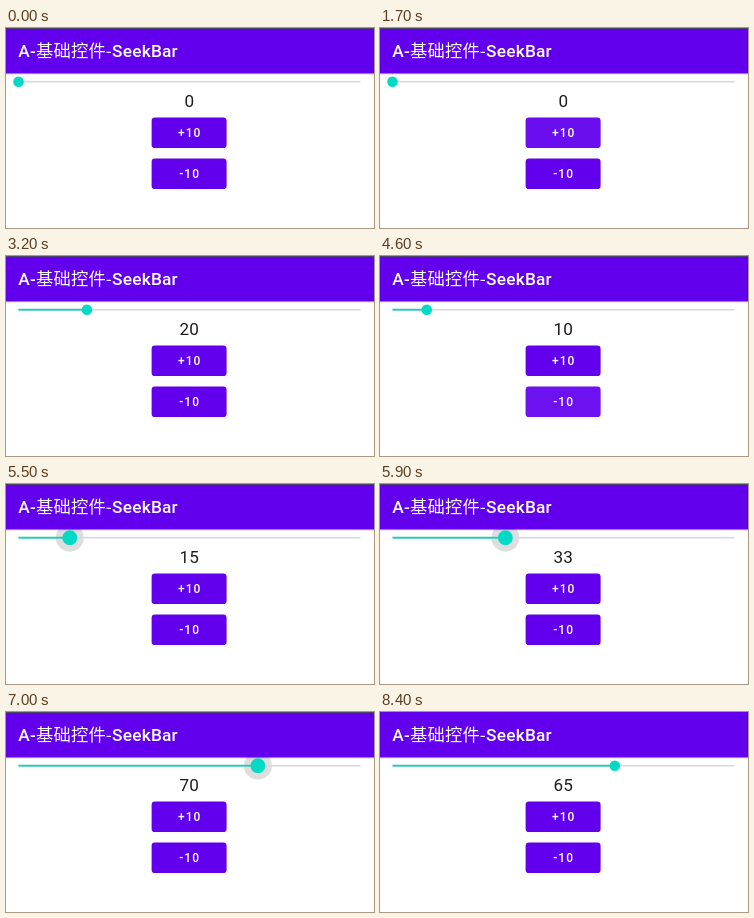
An HTML page with a canvas for the animation above (8.5 s loop, 368 px wide and 200 px high).

```html
<!DOCTYPE html>
<html lang="zh">
<head>
<meta charset="utf-8">
<title>SeekBar</title>
<style>
html, body { margin: 0; width: 100%; height: 100%; overflow: hidden; background: #fff; }
canvas, svg { position: absolute; left: 0; top: 0; width: 368px; height: 200px; }
text { font-family: Roboto, "Noto Sans CJK SC", "Noto Sans CJK", sans-serif; }
.title { font-size: 17.3px; font-weight: 500; letter-spacing: .21px; fill: #fff; }
.cjk { font-family: "Noto Sans CJK SC", "Noto Sans CJK", sans-serif; font-weight: 400; }
.value { font-size: 17.1px; fill: #1c1c1c; text-anchor: middle; }
.label { font-size: 12px; font-weight: 500; letter-spacing: 1.07px; fill: #fff; text-anchor: middle; }
</style>
</head>
<body>
<canvas id="stage"></canvas>
<svg viewBox="0 0 368 200">
  <text class="title" x="12.3" y="28.7">A-<tspan class="cjk">基础控件-</tspan>SeekBar</text>
  <text class="value" id="value" x="183.2" y="79.4">0</text>
  <text class="label" x="183.7" y="109.3">+10</text>
  <text class="label" x="183.7" y="150.3">-10</text>
</svg>
<script>
const LOOP = 8500, STEP = 100;
const PURPLE = '#6200ee', TEAL = '#03dac5';
const TRACK = { x: 12.5, w: 342, y: 53.7 };

const canvas = document.getElementById('stage');
const label = document.getElementById('value');
const ctx = canvas.getContext('2d');
const dpr = window.devicePixelRatio || 1;
canvas.width = 368 * dpr;
canvas.height = 200 * dpr;
ctx.scale(dpr, dpr);

const clamp = u => Math.max(0, Math.min(1, u));
const ramp = (t, from, to) => clamp((t - from) / (to - from));
const easeOut = u => 1 - (1 - u) ** 2;
const smooth = u => u * u * (3 - 2 * u);

// Taps step the value; then a drag creeps up, sweeps right and settles back.
function progress(t) {
  if (t < 1800) return 0;
  if (t < 2800) return 10;
  if (t < 4400) return 20;
  return Math.round(10
    + 28 * ramp(t, 5300, 6000) ** 1.4
    + 48 * easeOut(ramp(t, 6000, 6500))
    - 21 * smooth(ramp(t, 6600, 7200)));
}

// Strength of the halo while the thumb is held
const hold = t => ramp(t, 5050, 5300) * (1 - ramp(t, 7200, 7500));

// Button highlight: quick rise, slower fade
const glow = (t, start, end) =>
  .1 * Math.min(ramp(t, start - 100, start + 100), 1 - ramp(t, end - 300, end));

function rect(x, y, w, h, color) {
  ctx.fillStyle = color;
  ctx.fillRect(x, y, w, h);
}

function disc(x, y, r, color) {
  ctx.fillStyle = color;
  ctx.beginPath();
  ctx.arc(x, y, r, 0, Math.PI * 2);
  ctx.fill();
}

function button(y, light) {
  ctx.beginPath();
  ctx.roundRect(145.6, y, 75, 30.7, 3.4);
  ctx.fillStyle = PURPLE;
  ctx.fill();
  ctx.fillStyle = `rgba(255,255,255,${light})`;
  ctx.fill();
}

function seekBar(value, held) {
  const x = TRACK.x + TRACK.w * value / 100;
  ctx.save();
  ctx.beginPath();
  ctx.rect(0, 45, 368, 40);
  ctx.clip();
  if (held) disc(x, TRACK.y, 10 + 4 * clamp(held * 1.6), `rgba(0,0,0,${.13 * held})`);
  rect(TRACK.x, TRACK.y - .9, TRACK.w, 1.8, '#dcd9e2');
  rect(TRACK.x, TRACK.y - .9, x - TRACK.x, 1.8, '#0fd0bf');
  disc(x, TRACK.y, 5.3 + 2.1 * held, TEAL);
  ctx.restore();
}

function draw(t) {
  rect(0, 0, 368, 200, '#fff');
  rect(0, 45, 368, 2, '#efe8fa');
  rect(0, 0, 368, 45.5, PURPLE);
  if (t < 8400) {
    rect(0, 0, 368, 1, '#4b4468');
    rect(0, 1, 368, 1, '#4a1f9a');
  }
  const value = progress(t);
  seekBar(value, hold(t));
  button(89.4, glow(t, 1700, 2100) + glow(t, 2700, 3200));
  button(130.4, glow(t, 4300, 4800));
  label.textContent = value;
}

function frame() {
  const t = performance.now() % LOOP;
  draw(Math.floor(t / STEP) * STEP);
  requestAnimationFrame(frame);
}
frame();
</script>
</body>
</html>
```
